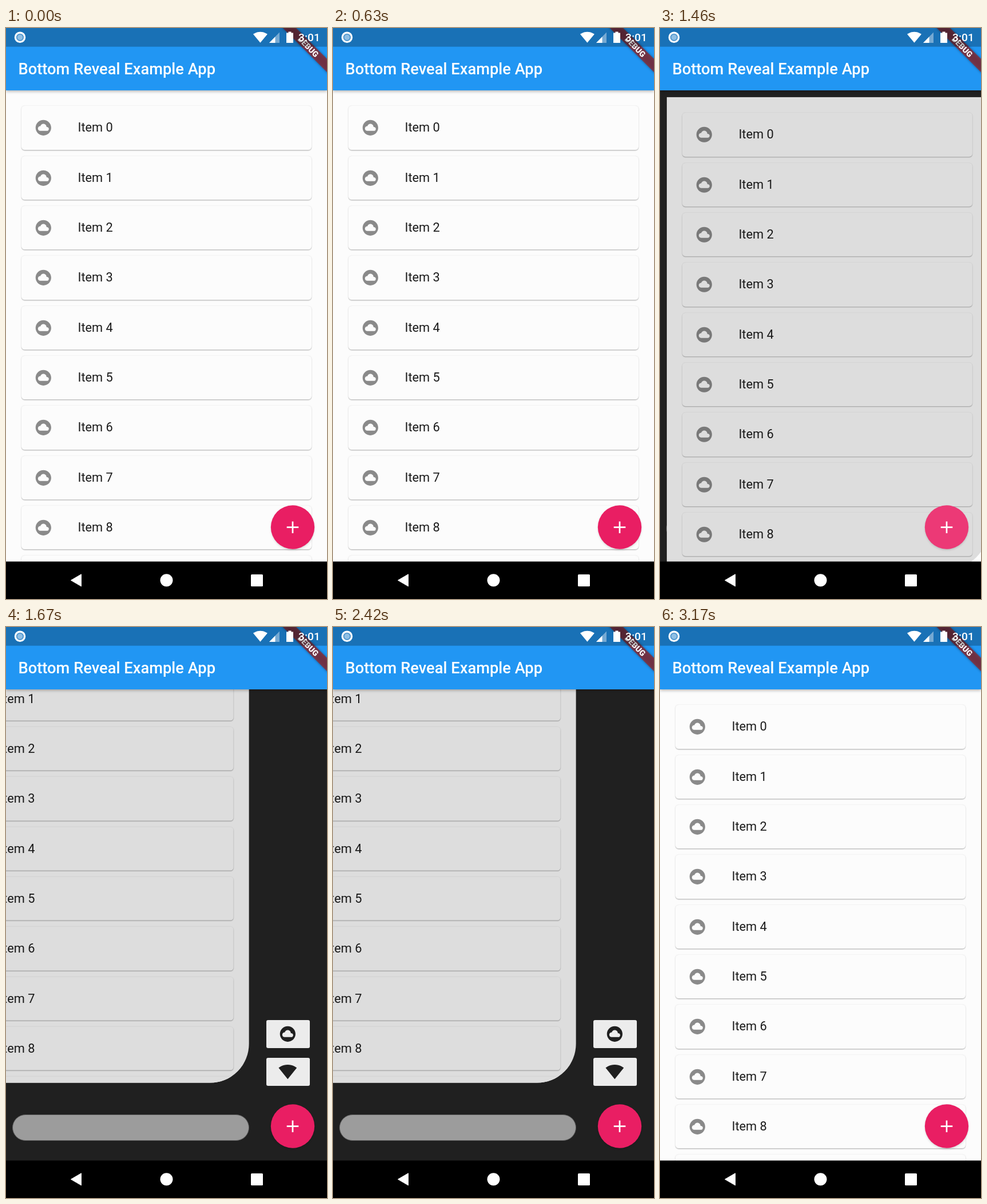
Write an HTML page that moves like this. It is 561x998 px and loops after 3.21 s.

```html
<!DOCTYPE html>
<html lang="en">
<head>
<meta charset="utf-8">
<title>Bottom Reveal Example App</title>
<style>
html, body { margin: 0; width: 100%; height: 100%; overflow: hidden; background: #000; }
body { position: relative; font-family: Roboto, Arial, sans-serif; }
div, svg { position: absolute; box-sizing: border-box; }
#view { left: 0; top: 109px; width: 561px; height: 824px; overflow: hidden; background: #202020; }
#page, #shade { left: 0; top: 0; width: 561px; height: 824px; }
#page { overflow: hidden; background: #fcfcfc; }
#shade { background: rgba(0,0,0,.12); border-bottom-right-radius: 68px; }
.card { left: 27.3px; width: 506.5px; height: 76.4px; border-radius: 5.5px; background: #fcfcfc;
  box-shadow: 0 1.4px 1.4px rgba(0,0,0,.22), 0 0 2px rgba(0,0,0,.14); }
.card svg { left: 21.8px; top: 21.8px; fill: #8a8a8a; }
.card span { position: absolute; left: 98.2px; line-height: 76.4px; font-size: 21.8px; color: #1b1b1b; white-space: pre; }
.tile { left: 455px; width: 76px; height: 49px; border-radius: 3px; background: #ececec; }
.tile svg { left: 21px; top: 8px; fill: #1f1f1f; }
#field { left: 11px; top: 742.5px; width: 414px; height: 46.5px; border-radius: 24px; background: #9c9c9c; border: 1.5px solid #5a5a5a; }
#bar { left: 0; top: 0; width: 561px; height: 109px; background: #2196f3; box-shadow: 0 2px 5px rgba(0,0,0,.28); }
#top { left: 0; top: 0; }
</style>
</head>
<body>
<svg width="0" height="0">
  <defs>
    <path id="cloud" d="M12 2C6.48 2 2 6.48 2 12s4.48 10 10 10 10-4.48 10-10S17.52 2 12 2zm4.5 14H8c-1.66 0-3-1.34-3-3s1.34-3 3-3l.14.01C8.58 8.28 10.13 7 12 7c2.21 0 4 1.79 4 4h.5c1.38 0 2.5 1.12 2.5 2.5S17.88 16 16.5 16z"/>
    <path id="wifi" d="M12 21.5L23.64 7C23.19 6.66 18.71 3 12 3S.81 6.66.36 7z"/>
  </defs>
</svg>
<div id="view">
  <div class="tile" style="top:578px"><svg width="32.7" height="32.7" viewBox="0 0 24 24"><use href="#cloud"/></svg></div>
  <div class="tile" style="top:643.5px"><svg width="32.7" height="32.7" viewBox="0 0 24 24"><use href="#wifi"/></svg></div>
  <div id="field"></div>
  <div id="page"></div>
  <div id="shade"></div>
</div>
<div id="bar"></div>
<svg id="top" width="561" height="998" viewBox="0 0 561 998" fill="#fff">
  <defs>
    <filter id="blur" x="-30%" y="-30%" width="160%" height="160%"><feGaussianBlur stdDeviation="2"/></filter>
  </defs>
  <text x="21.5" y="81" font-size="27.3" font-weight="500">Bottom Reveal Example App</text>
  <g transform="translate(561) rotate(45)">
    <rect x="-70" y="38.2" width="140" height="16.4" fill="#000" opacity=".4" filter="url(#blur)"/>
    <rect x="-70" y="38.2" width="140" height="16.4" fill="#a01c1c" opacity=".66"/>
    <text y="51.2" font-size="13.9" font-weight="900" text-anchor="middle">DEBUG</text>
  </g>
  <rect width="561" height="32.7" fill="#000" opacity=".25"/>
  <circle cx="24.5" cy="16.3" r="8.2" fill="#8fbfe4" stroke="#fff" stroke-width="3.2"/>
  <circle cx="24.5" cy="16.3" r="5.6" fill="none" stroke="#4d94cc" stroke-width="1.6"/>
  <use href="#wifi" transform="translate(431.6 3.6) scale(1.07 1.03)"/>
  <path d="M478 7.5V26H460z" opacity=".4"/>
  <path d="M470.5 15.2V26H460z"/>
  <path d="M493.5 6.5h5v2h3.5V26H490V8.5h3.5z"/>
  <text x="511" y="23.3" font-size="19.2" font-weight="500">3:01</text>
  <circle cx="501" cy="874.5" r="37" fill="#000" opacity=".22" filter="url(#blur)"/>
  <circle cx="501" cy="872.5" r="38.2" fill="#e91e63"/>
  <circle id="splash" cx="501" cy="872.5"/>
  <path d="M490.7 872.7h20.6M501 862.4v20.6" stroke="#fff" stroke-width="2.7"/>
  <rect y="932.5" width="561" height="65.5" fill="#000"/>
  <path d="M113.5 965.3L131.5 954.8v21z" stroke="#fff" stroke-linejoin="round"/>
  <circle cx="280.5" cy="965.3" r="11"/>
  <rect x="428" y="955" width="21" height="21" rx="1.5"/>
</svg>
<script>
const LOOP = 3210, OPEN = 1331, CLOSE = 2535, MOVE = 300;
const SHIFT = 136.4, RADIUS = 68;
const $ = id => document.getElementById(id);
const clamp = x => Math.max(0, Math.min(1, x));

for (let i = 0; i < 10; i++) {
  $('page').insertAdjacentHTML('beforeend',
    `<div class="card" style="top:${27.4 + 87.33 * i}px">
      <svg width="32.7" height="32.7" viewBox="0 0 24 24"><use href="#cloud"/></svg><span>Item ${i}</span></div>`);
}

const bezier = (a, b, u) => 3 * (1 - u) ** 2 * u * a + 3 * (1 - u) * u * u * b + u ** 3;

// Pulls back a little before setting off.
function easeInBack(x) {
  if (x <= 0 || x >= 1) return clamp(x);
  let lo = 0, hi = 1;
  for (let i = 0; i < 24; i++) {
    const mid = (lo + hi) / 2;
    if (bezier(.6, .735, mid) < x) lo = mid; else hi = mid;
  }
  return bezier(-.28, .045, lo);
}

function draw(t) {
  const isOpen = t >= OPEN && t < CLOSE;
  const phase = t < CLOSE ? (t - OPEN) / MOVE : 1 - (t - CLOSE) / MOVE;
  const p = easeInBack(phase);
  const move = `translate(${-SHIFT * p}px, ${-SHIFT * p}px)`;
  $('page').style.transform = $('shade').style.transform = move;
  $('page').style.borderBottomRightRadius = RADIUS * Math.max(0, p) ** 2 + 'px';
  $('shade').style.display = isOpen ? '' : 'none';
  $('splash').setAttribute('r', 38.2 * clamp((t - 1240) / 200));
  $('splash').setAttribute('opacity', .12 * clamp((1660 - t) / 180));
}

const start = performance.now();
function tick() {
  draw((performance.now() - start) % LOOP);
  requestAnimationFrame(tick);
}
tick();
</script>
</body>
</html>
```
